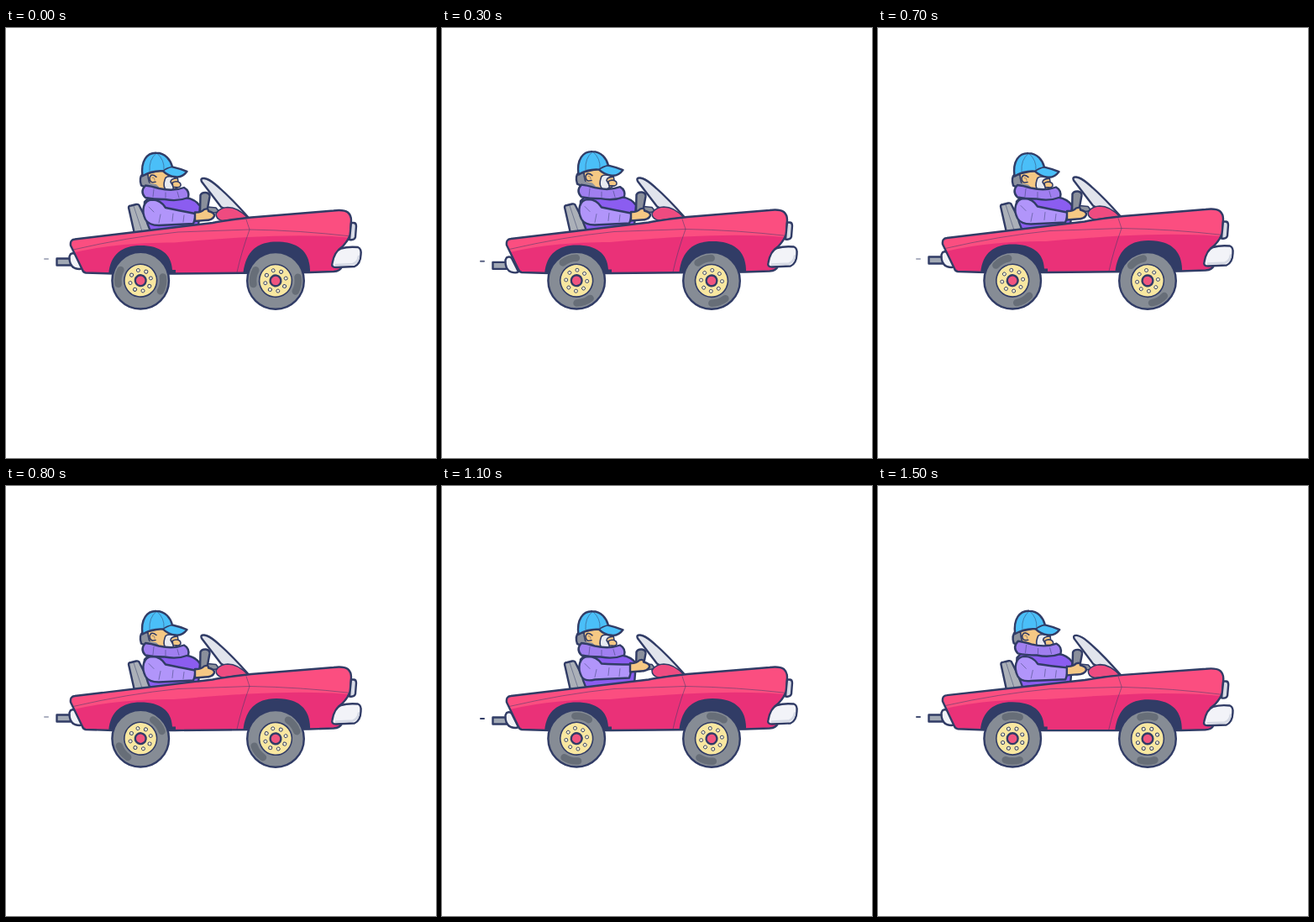
Write an HTML page that moves like this. It is 512 px wide and 512 px high and loops after 1.6 s.

```html
<!DOCTYPE html>
<html lang="en">
<head>
<meta charset="utf-8">
<title>Convertible</title>
<style>
html, body { margin: 0; width: 100%; height: 100%; overflow: hidden; background: #fff; }
svg { display: block; width: 100vw; height: 100vh; }
.o { stroke: #313c66; stroke-width: 2.4; stroke-linejoin: round; stroke-linecap: round; }
.s { stroke-width: 1.6; }
.t { fill: none; stroke: #313c66; stroke-width: .7; stroke-linecap: round; opacity: .7; }
</style>
</head>
<body>
<svg viewBox="0 0 512 512">
  <defs>
    <path id="shell" d="M82 251.500 L160 242.300 L246 232 Q268 228 292 225.500 L390 217.500 Q402 216 407 219.500 Q411 223 411 229 L410 246 Q405 258 396 264 L400 284 Q398 289.500 390 290 L361 291 L201 292.500 L128 292.500 L95 291.500 Q92 291 91 288 L77 259 Q76 252 82 251.500Z"/>
    <clipPath id="inside"><use href="#shell"/></clipPath>
    <g id="tyre">
      <circle class="o" r="33.800" fill="#868c95"/>
    </g>
    <g id="spin">
      <g id="mark"><path d="M25.500 -8.500 A27 27 0 0 1 25.500 8.500" fill="none" stroke="#676e78" stroke-width="8.500" stroke-linecap="round"/></g>
      <use href="#mark" transform="rotate(180)"/>
      <circle class="o s" r="19.400" fill="#f8e7a0"/>
      <g id="bolts"></g>
      <circle class="o" r="6.400" fill="#f0557f"/>
    </g>
  </defs>

  <path id="puff" d="M46 0H50" stroke="#313c66" stroke-width="2" stroke-linecap="round"/>
  <g id="rear">
    <path class="o" fill="#e33370" d="M80 283 L104 284 Q108 281 105 277 L84 276Z"/>
    <path class="o" fill="#a1a8b4" d="M60.500 272.500H77V280.500H60.500Z"/>
    <path class="o" fill="#f1f3f8" d="M77 267 Q81 265 83 268 L91 284 Q88 286 82 284 Q75 281 75.500 270Z"/>
  </g>

  <g id="car">
    <path class="o" fill="#abb0b8" d="M146 214 Q146 211.500 149 211.500 L155 210 Q158 209.500 159 212 L174 242 L153 245Z"/>
    <path class="t" d="M152 212L162 242"/>

    <g id="man">
      <path class="o" fill="#8b5df0" d="M170 202 L214 202 Q226 204 231 212 L229 236 L172 242 Q163 222 165 207Z"/>
      <g id="head">
        <path class="o" fill="#8c919d" d="M163 173 Q158 178 161 187 L174 193 L182 176Z"/>
        <path class="o s" fill="#f5c884" d="M169 173 L193 168 L204 176 L205 183 Q209 186 205 189 L198 193 L175 191 Q169 184 169 173Z"/>
        <path fill="#8c919d" d="M169 184 L179 186 L186 193 L170 192Z"/>
        <path class="o s" fill="#e9ebf1" d="M190 178 Q194 174.500 204 178.500 Q196 179 196 183 L199 188 Q201 193 193 194 Q185 190 190 178Z"/>
        <path class="o s" fill="#f5c884" d="M198 184 Q203 181 207 184 Q210 188 205 189.500 L199 189Z"/>
        <path class="o s" fill="#f5c884" d="M179 177 Q173 172 171 178 Q171 185 178 183"/>
        <path class="t" d="M174 178Q177 177 177 181"/>
        <path class="o" fill="#4abff8" d="M162.500 176 C160 158 168 148 179 148.500 C190 148.500 196 157 198 165 Q207 167 215.500 170.500 Q210 178 202 177 Q193 176 187 170 Q174 169 162.500 176Z"/>
        <path class="o s" fill="none" d="M187 170Q191 166.500 198 165"/>
        <path class="t" d="M179 149Q170 156 171 170M180 149Q189 157 188 168"/>
      </g>
      <path class="o" fill="#a07ff0" d="M166 187.500 Q172 188 182 191 Q199 195 212 190 Q219 194 217 202 Q204 207 189 204 Q175 204 166 202 Q159 195 166 187.500Z"/>
      <path class="t" d="M176 192L175 201M190 196L190 202M204 195L206 202"/>
    </g>

    <path class="o s" fill="#8d929d" d="M240 213L250 214L254 219L240 221Z"/>
    <path class="o" fill="#8a8f9b" d="M231.500 199 Q233 195.500 238 196 Q243 197 242.500 201 L239 220 Q236 224 231 221Z"/>
    <path class="o" id="sleeve" fill="#b195fa"/>
    <path class="t" id="folds"/>
    <path class="o" id="hand" fill="#f5c884" d="M225 219.500 Q232 220 236 216 Q241 214 241 218 Q249 220 248 224 Q246 229 237 229 L225 230Z"/>

    <path class="o" fill="#e1e4ec" d="M233 183 Q231 178.500 236 179 Q242 180 249 186 Q266 200 289 226 L279 226 L256 213Z"/>
    <path class="o s" fill="#ee4b80" d="M250 221 Q254 214 264 213.500 Q276 213.500 288 226 L258 229.500 Q250 228 250 221Z"/>

    <use href="#shell" fill="#ea3178"/>
    <g clip-path="url(#inside)">
      <path fill="#fb4e80" d="M70 270 Q105 261 140 258 Q170 255 200 255.500 Q240 252 288 249 Q340 246 388 248 L415 250 V210 H70Z"/>
      <path fill="#313c66" d="M122 296 C123 270 138 259 160 259 C184 259 197 269 198 288 H202 V296Z"/>
      <path fill="#313c66" d="M282 296 C284 266 299 254.500 322 254.500 C347 254.500 361 265 362 288 V296Z"/>
      <path class="t" d="M80 264 Q145 249 205 243 L290 240 Q350 241 411 248M286 228L290 240Q280 268 275 291"/>
    </g>
    <use class="o" href="#shell" fill="none"/>
    <path class="o" fill="#d8dce6" d="M411 232 H414 Q417 232 417 236 L416 249 Q415 253 409 252Z"/>
    <path class="o" fill="#f2f3f8" d="M388.500 280 Q391 266 399 262.500 Q407 260 419 261 Q423.500 263 422.500 270 Q422 281 415 284 L393 285 Q387 285 388.500 280Z"/>
    <path d="M393 282 L413 281 Q419 279 420 272" fill="none" stroke="#d5d9e4" stroke-width="2.500" stroke-linecap="round"/>
  </g>

  <g transform="translate(160.200 300.700)"><use href="#tyre"/><use class="wheel" href="#spin"/></g>
  <g transform="translate(321 300.900)"><use href="#tyre"/><use class="wheel" href="#spin"/></g>
</svg>
<script>
const $ = id => document.getElementById(id);
const LOOP = 1600, STEP = 100;
const times = [0, 200, 500, 800, 1100, 1300, 1500, LOOP];
const tracks = {
  spin: [9.5, 157.5, 437.5, 682.5, 1004.5, 1132.5, 1350, 1449.5],
  lift: [0, 0, -1.5, -1.5, -1.5, -1.2, -1, 0],
  pitch: [0, 0, 0, 0, 0, 0, .5, 0],
  drop: [2, 9.5, 0, 0, 3, 7.5, 0, 2],
  puffY: [275, 279, 275, 275, 277, 281, 275, 275],
  puff: [.4, 1, .4, .4, 1, .4, .9, .4],
  head: [.3, -2.5, 2.3, 2, 2.3, 2, 1.8, .3],
  chest: [0, -1, 1, 1, 1, 1, -1, 0],
  arm: [0, 0, 0, 0, 1, 1, .5, 0]
};

// Eight holes, offset so the tyre marks fall midway between two of them
$("bolts").innerHTML = Array.from({ length: 8 }, (_, i) =>
  `<circle cx="12.500" r="2" fill="#fff7d0" stroke="#313c66" stroke-width=".9" transform="rotate(${i * 45 + 22.5})"/>`
).join("");

const wheels = document.querySelectorAll(".wheel");

function at(name, t) {
  const v = tracks[name];
  let i = 0;
  while (t >= times[i + 1]) i++;
  return v[i] + (v[i + 1] - v[i]) * (t - times[i]) / (times[i + 1] - times[i]);
}

const move = (id, value) => $(id).setAttribute("transform", value);

function draw(t) {
  const get = name => at(name, t);
  const a = get("arm");

  wheels.forEach(w => w.setAttribute("transform", `rotate(${get("spin")})`));
  move("car", `translate(0 ${get("lift")}) rotate(${get("pitch")} 245 260)`);
  move("rear", `translate(0 ${get("drop")})`);
  move("man", `translate(0 ${get("chest")})`);
  move("head", `translate(0 ${get("head") - get("chest")})`);
  move("hand", `translate(${-a} ${-7 * a})`);
  move("puff", `translate(0 ${get("puffY")})`);
  $("puff").setAttribute("opacity", get("puff"));

  $("sleeve").setAttribute("d",
    `M174 204.500 C163 205 161 218 166 228 Q170 235 182 ${235 - 3 * a}
     L223 ${233 - 3 * a} Q226 ${226 - 5 * a} 225 ${221 - 7 * a}
     Q204 ${217 - 3 * a} 190 ${214 - a} Q184 204.500 174 204.500Z`);
  $("folds").setAttribute("d",
    `M170 213L176 219M184 ${222 - 2 * a}L182 ${232 - 3 * a}M199 ${221 - 3 * a}L198 ${230 - 3 * a}M212 ${223 - 4 * a}L211 ${231 - 3 * a}`);
}

function tick(now) {
  draw(Math.floor(now % LOOP / STEP) * STEP);
  requestAnimationFrame(tick);
}
draw(0);
requestAnimationFrame(tick);
</script>
</body>
</html>
```
